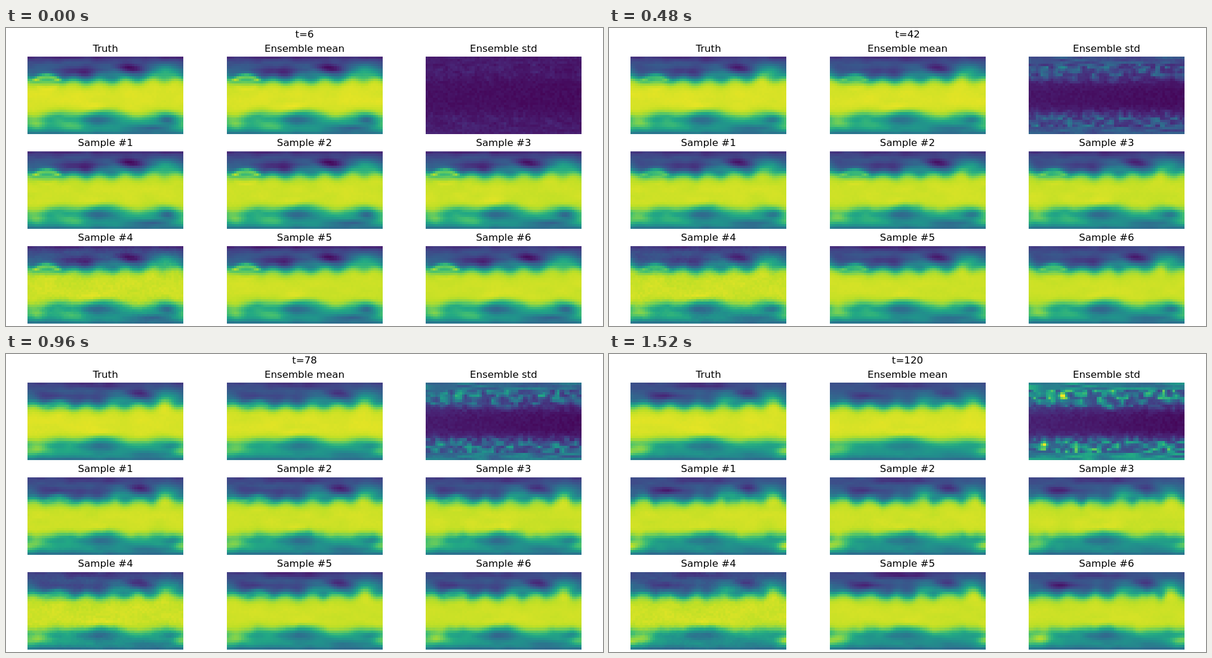
An HTML page with a canvas for the animation above (1600 ms loop, 1000x500 px).

```html
<!DOCTYPE html>
<html lang="en">
<head>
<meta charset="utf-8">
<title>Ensemble forecast</title>
<style>
html, body { margin: 0; width: 100%; height: 100%; overflow: hidden; background: #fff; }
canvas { position: absolute; width: 261px; height: 130px; image-rendering: pixelated; }
svg { position: absolute; left: 0; top: 0; }
text { font: 16.667px "DejaVu Sans", sans-serif; text-anchor: middle; }
</style>
</head>
<body>
<svg width="1000" height="500"><text id="clock" x="500" y="16"></text></svg>
<script>
const W = 64, H = 32, STEPS = 20, STEP_MS = 80;
const TITLES = ['Truth', 'Ensemble mean', 'Ensemble std'];
for (let i = 1; i <= 6; i++) TITLES.push('Sample #' + i);

// drifting weather: x, y, width, height, strength, drift in x, final strength
const BLOBS = [
  [41, 4.5, 4, 1.4, -.28, 6, -.16],
  [21, 6, 5, 1.7, -.2, 6, -.02],
  [3, 5, 4, 1.2, 0, 10, -.2],
  [27, 1, 8, 1, 0, 2, -.14],
  [56, 6, 4, 2.4, .3, 1, .27],
  [36, 6, 4, 2, .12, 4, .22],
  [28, 25.5, 5.5, 1.7, -.22, 1, -.16],
  [57, 25.5, 2.6, 1.5, -.25, 3, -.03],
  [50, 29, 6, 1.1, -.2, -2, -.05],
  [18, 28, 5, 1.8, .15, -6, 0],
  [3, 27, 3, 1.7, .2, 1, .28],
  [62, 28, 2.5, 1.5, .05, 0, .24],
  [28, 20.5, 4, 1.2, .045, 2, .045]
];

// places where the samples disagree most: x, y, final spread
const HOT = [[13.5, 5, .55], [60, 5, .4], [6, 25, .55], [33, 9.3, .35]];

const VIRIDIS = '440154 482475 414487 355f8d 2a788e 21918c 22a884 44bf70 7ad151 bddf26 fde725'
  .split(' ').map(h => [0, 2, 4].map(k => parseInt(h.slice(k, k + 2), 16)));

const mix = (a, b, f) => a + (b - a) * f;
const ease = f => f * f * (3 - 2 * f);
const sig = v => 1 / (1 + Math.exp(-v));
const bell = (dx, dy = 0) => Math.exp(-(dx * dx + dy * dy) / 2);
const wave = (x, count) => Math.cos(2 * Math.PI * count * x / W);
const around = d => d - W * Math.round(d / W);

function hash(x, y, seed) {
  let h = Math.imul(x + 101, 374761393) ^ Math.imul(y + 57, 668265263) ^ Math.imul(seed + 13, 1274126177);
  h = Math.imul(h ^ (h >>> 13), 1103515245);
  return ((h ^ (h >>> 16)) >>> 0) / 4294967296;
}

function noise(x, y, seed) {
  const i = Math.floor(x), j = Math.floor(y), f = ease(x - i), g = ease(y - j);
  return mix(mix(hash(i, j, seed), hash(i + 1, j, seed), f),
             mix(hash(i, j + 1, seed), hash(i + 1, j + 1, seed), f), g);
}

// rows where the warm belt begins and ends
const northEdge = (x, p) => 8.8 + .6 * wave(x - 13 - 8.3 * p, 6) - .4 * wave(x - 56, 1);
const southEdge = (x, p) => 23.6 + (.8 - .5 * p) * wave(x - 2, 3) - 1.4 * bell((x - 27 - p) / 5.5);

// a curl on the northern edge that moves east and dissolves
function curl(x, y, p) {
  const r = Math.hypot((x - 7.5 - 7 * p) / 4.8, (y - 10) / 2.6);
  return (1 - p) * ((y < 10 ? .32 : .03) * bell((r - 1) / .25) - .08 * bell(r / .5));
}

function temperature(n, p) {
  const sample = n > 2, vary = sample ? .2 + .8 * p : 0;
  const gain = sample ? .98 : 1, grain = n === 6 ? .012 : .004;
  const detail = n === 1 ? 1 - .3 * p : 1;
  const top = sample ? (hash(n, 0, 3) - .5) * .08 : 0;
  const blobs = BLOBS.map(([x, y, w, h, a, drift, a2], b) => ({
    x: x + drift * p + (hash(b, 1, n) - .5) * 2 * vary,
    y, w, h, a: mix(a, a2, p) * detail * (1 + (hash(b, 2, n) - .5) * vary * .6)
  }));
  const wobble = (x, seed) => (noise(x / 3, p * 3, seed) - .5) * vary;

  return (x, y) => {
    const polar = y < 16
      ? .28 - (.14 - .1 * p) * Math.exp(-y / 2) + top * Math.exp(-y)
      : .58 - .03 * p - .17 * Math.exp((y - 31) / 1.3);
    const inside = y < 16
      ? sig((y - northEdge(x, p) - wobble(x, n)) / 1.05)
      : sig((southEdge(x, p) + wobble(x, n + 20) - y) / .85);
    let v = mix(polar, .945, inside) + curl(x, y, p) * detail;
    for (const b of blobs) v += b.a * bell(around(x - b.x) / b.w, (y - b.y) / b.h);
    v += (noise(x / 4 - 2 * p, y / 1.7, 30) - .5) * .07 * (1 - inside) * detail;
    v += (noise(x / 7 - p, y / 3, n + 40) - .5) * .025;
    v += (hash(x, y, n + 60 + Math.round(p * 19)) - .5) * 2 * grain;
    return Math.min(v, .99) * gain;
  };
}

function spread(p) {
  const grow = .045 + .38 * Math.pow(p, .65);
  return (x, y) => {
    const mask = sig((9 - y) / 1.2) + sig((y - 22.7) / .9);
    const pole = y < 3 || y > 28;
    const s = pole ? noise(x / 6 - p, y, 5) : noise(x / 1.9 - p * 2, y / 1.5 + p, 6);
    let v = .01 + .035 * hash(x, y, 7) + (.015 + .05 * p) * (1 - x / W);
    v += mask * grow * (pole ? .6 + .7 * s : .4 + 1.4 * s * s);
    for (const [cx, cy, a] of HOT) v += a * p * bell((x - cx) / 1.1, (y - cy) / .8);
    return v;
  };
}

function paint(ctx, field) {
  const img = ctx.createImageData(W, H);
  for (let y = 0, o = 0; y < H; y++)
    for (let x = 0; x < W; x++, o += 4) {
      const v = Math.max(0, Math.min(1, field(x, y))) * 10, k = Math.min(9, Math.floor(v));
      for (let c = 0; c < 3; c++) img.data[o + c] = mix(VIRIDIS[k][c], VIRIDIS[k + 1][c], v - k);
      img.data[o + 3] = 255;
    }
  ctx.putImageData(img, 0, 0);
}

const svg = document.querySelector('svg'), clock = document.getElementById('clock');
const maps = TITLES.map((title, n) => {
  const column = n % 3, row = Math.floor(n / 3);
  const canvas = document.createElement('canvas');
  canvas.width = W;
  canvas.height = H;
  canvas.style.left = Math.round(36 + 333.6 * column) + 'px';
  canvas.style.top = 48 + 159 * row + 'px';
  document.body.append(canvas);
  const label = document.createElementNS(svg.namespaceURI, 'text');
  label.setAttribute('x', 166.6 + 333.4 * column);
  label.setAttribute('y', Math.floor(40 + 158.6 * row));
  label.textContent = title;
  svg.append(label);
  return canvas.getContext('2d');
});

const start = performance.now();
let shown = -1;
function tick() {
  const step = Math.floor((performance.now() - start) / STEP_MS) % STEPS;
  if (step !== shown) {
    shown = step;
    const p = step / (STEPS - 1);
    clock.textContent = 't=' + 6 * (step + 1);
    maps.forEach((ctx, n) => paint(ctx, n === 2 ? spread(p) : temperature(n, p)));
  }
  requestAnimationFrame(tick);
}
tick();
</script>
</body>
</html>
```
